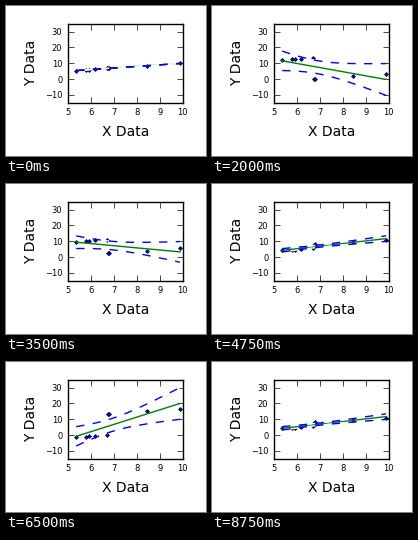
Recreate the animation shown at these times as a matplotlib script. Size 200 by 150 pixels, loop 9000 ms.

```python
import numpy as np
import matplotlib.pyplot as plt
from matplotlib.animation import FuncAnimation

W, H, DPI = 200, 150, 100
FRAMES, INTERVAL = 36, 250
LEFT, RIGHT, TOP, BOTTOM = 61.9, 176.8, 17.8, 96.7

AMP = 6.85   # largest shift of the points away from y = x
T95 = 2.365  # Student t, 95 % two-sided, 7 degrees of freedom

x = np.array([5.36, 5.78, 5.91, 6.17, 6.70, 6.75, 6.79, 8.43, 9.88])
side = np.where(x < 6.72, 1, -1)
grid = np.linspace(x.min(), x.max(), 100)

plt.rcParams.update({
    "font.family": "DejaVu Sans",
    "axes.linewidth": 1.0,
    "lines.linewidth": 1.0,
    "lines.scale_dashes": False,
})


def fit_band(y):
    """Least-squares line on the grid and the half-width of its 95 % band."""
    n, dx = len(x), x - x.mean()
    sxx = (dx ** 2).sum()
    slope = (dx * y).sum() / sxx
    resid = y - y.mean() - slope * dx
    s = np.sqrt((resid ** 2).sum() / (n - 2))
    gx = grid - x.mean()
    return y.mean() + slope * gx, T95 * s * np.sqrt(1 / n + gx ** 2 / sxx)


fig = plt.figure(figsize=(W / DPI, H / DPI), dpi=DPI, facecolor="white")
ax = fig.add_axes([LEFT / W, 1 - BOTTOM / H, (RIGHT - LEFT) / W, (BOTTOM - TOP) / H])
ax.set(xlim=(5, 10), ylim=(-15, 35), xticks=range(5, 11), yticks=range(-10, 31, 10))
ax.tick_params(direction="in", top=True, right=True, length=4, width=0.5,
               pad=4, labelsize=6)

label = dict(fontsize=10, ha="center", va="baseline", rotation_mode="anchor")
fig.text((LEFT + RIGHT) / 2 / W, 1 - 130 / H, "X Data", **label)
fig.text(29 / W, 1 - (TOP + BOTTOM) / 2 / H, "Y Data", rotation=90, **label)

points, = ax.plot([], [], "D", ms=2, mfc="b", mec="k", mew=0.5)
line, = ax.plot([], [], color="g")
upper, lower = (
    ax.plot([], [], color="b", ls=(0, (6, 6)), gapcolor="white",
            dash_capstyle="butt")[0]
    for _ in range(2)
)


def update(i):
    y = x + AMP * np.sin(2 * np.pi * i / FRAMES) * side
    mid, half = fit_band(y)
    points.set_data(x, y)
    line.set_data(grid, mid)
    upper.set_data(grid, mid + half)
    lower.set_data(grid, mid - half)
    return points, line, upper, lower


anim = FuncAnimation(fig, update, frames=FRAMES, interval=INTERVAL,
                     repeat=True, repeat_delay=0, blit=False)
plt.show()
```
